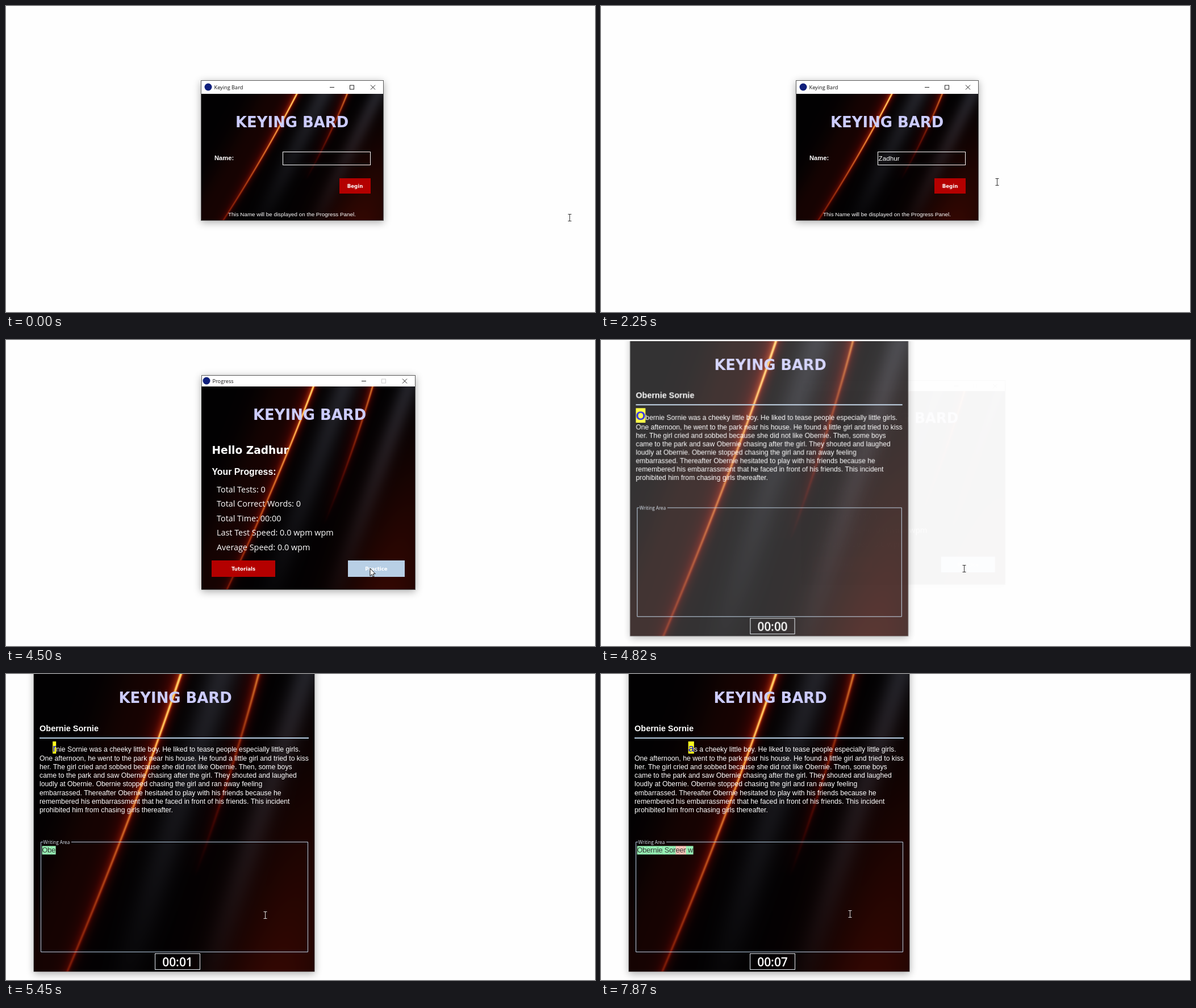
Animation of 1037x540 px, one loop 8 s. Source, as an HTML page with a canvas:

```html
<!DOCTYPE html>
<html lang="en">
<head>
<meta charset="utf-8">
<title>Keying Bard</title>
<style>
html, body { margin: 0; width: 100%; height: 100%; overflow: hidden; background: #fefefe; }
canvas { display: block; }
</style>
</head>
<body>
<canvas id="stage" width="1037" height="540"></canvas>
<script>
const W = 1037, H = 540, LOOP = 8000;
const KEY_GAP = 80, CLOCK_START = 5050, CLOCK_SECOND = 400;
const LOGIN_END = 3300, PROGRESS_END = 4690;

const stage = document.getElementById('stage').getContext('2d');
const layer = Object.assign(document.createElement('canvas'), { width: W, height: H });
const g = layer.getContext('2d');

const ARIAL = '"Liberation Sans", Arial, sans-serif';
const VERDANA = '"DejaVu Sans", Verdana, sans-serif';
const OPEN = '"Open Sans", "Noto Sans", sans-serif';
const RED = '#b40000', HOVER = '#cc0000', PALE = '#b8cfe5', LILAC = '#ccccff';

const USER = 'Zadhur';
const TITLE = 'Obernie Sornie';
const TYPED = 'Obernie Soreer w';
const STORY = [
  'Obernie Sornie was a cheeky little boy. He liked to tease people especially little girls.',
  'One afternoon, he went to the park near his house. He found a little girl and tried to kiss',
  'her. The girl cried and sobbed because she did not like Obernie. Then, some boys',
  'came to the park and saw Obernie chasing after the girl. They shouted and laughed',
  'loudly at Obernie. Obernie stopped chasing the girl and ran away feeling',
  'embarrassed. Thereafter Obernie hesitated to play with his friends because he',
  'remembered his embarrassment that he faced in front of his friends. This incident',
  'prohibited him from chasing girls thereafter.'
];

const clamp = (v, lo = 0, hi = 1) => Math.min(hi, Math.max(lo, v));
const progress = (t, start, span) => clamp((t - start) / span);
const easeOut = p => 1 - (1 - p) ** 2;

// Bursts of keystrokes: start time, number of keys, gap between keys
const NAME_BURSTS = [[380, 1], [930, 1], [1330, 1], [1480, 3]];
const STORY_BURSTS = [[5050, 1], [5280, 1], [5450, 5], [6320, 2, 0], [6390, 2, 0],
  [6620, 1], [7080, 1], [7390, 2, 0], [7870, 1]];

function keysTyped(bursts, t) {
  let total = 0;
  for (const [start, count, gap = KEY_GAP] of bursts) {
    for (let i = 0; i < count; i++) if (t >= start + i * gap) total++;
  }
  return total;
}

const MOVES = [
  { from: 1830, to: 2130, x: 697, y: 310 },
  { from: 2250, to: 2630, x: 617, y: 318 },
  { from: 3600, to: 3970, x: 641, y: 403 },
  { from: 4820, to: 5050, x: 456, y: 425 },
  { from: 6880, to: 7160, x: 438, y: 423 }
];
function pointerAt(t) {
  let x = 992, y = 373;
  for (const move of MOVES) {
    const p = easeOut(progress(t, move.from, move.to - move.from));
    x += (move.x - x) * p;
    y += (move.y - y) * p;
  }
  return [Math.round(x), Math.round(y)];
}

// Backdrop: two hot streaks, two slate beams and a dark red haze, in unit coordinates
const bell = (d, width) => Math.exp(-((d / width) ** 2));

function streakHeat(d) {
  const spread = d < 0 ? 1 : .5;
  return .62 * bell(d, .005) + .3 * bell(d, .02 * spread) + .22 * bell(d, .055 * spread);
}
function backdropColor(u, v) {
  const main = u - (.523 - .36 * v - .045 * v * v);
  const second = u - (.8 - .28 * v - .08 * v * v);
  const heat = clamp((1 - .62 * v) * streakHeat(main) + .72 * clamp(1 - v / .68) * streakHeat(second));
  const slate = clamp(1 - .85 * v) * (bell(u - .67 + .34 * v, .06) + bell(u - .97 + .34 * v, .05));
  const haze = .4 * bell(main + .12, .12) + v * bell(u - 1.12 + .25 * v, .22);
  return [
    2 + 255 * heat + 31 * slate + 48 * haze,
    1 + 200 * heat ** 2.5 + 32 * slate + 6 * haze,
    2 + 95 * heat ** 3.5 + 37 * slate
  ];
}
function makeBackdrop(w, h) {
  const c = Object.assign(document.createElement('canvas'), { width: w, height: h });
  const ctx = c.getContext('2d'), img = ctx.createImageData(w, h);
  for (let i = 0; i < w * h; i++) {
    img.data.set([...backdropColor(i % w / w, Math.floor(i / w) / h), 255], i * 4);
  }
  ctx.putImageData(img, 0, 0);
  return c;
}
const loginArt = makeBackdrop(320, 223);
const progressArt = makeBackdrop(376, 358);
const typingArt = makeBackdrop(494, 525);

function text(str, x, y, font, color = '#fff', align = 'left') {
  g.font = font;
  g.fillStyle = color;
  g.textAlign = align;
  g.fillText(str, x, y);
}
function width(str, font) {
  g.font = font;
  return g.measureText(str).width;
}
function box(x, y, w, h, color) {
  g.fillStyle = color;
  g.fillRect(x, y, w, h);
}
function outline(x, y, w, h, color) {
  g.strokeStyle = color;
  g.lineWidth = 1;
  g.strokeRect(x + .5, y + .5, w, h);
}
function line(color, points, ctx = g) {
  ctx.strokeStyle = color;
  ctx.lineWidth = 1;
  ctx.beginPath();
  points.forEach(([x, y]) => ctx.lineTo(x, y));
  ctx.stroke();
}
function button(label, x, y, w, h, color) {
  box(x, y, w, h, color);
  text(label, x + w / 2, y + h / 2 + 3.5, `bold 8.6px ${VERDANA}`, '#fff', 'center');
}
function appTitle(x, y) {
  text('KEYING BARD', x, y, `bold 25.9px ${VERDANA}`, LILAC);
}

function frame(x, y, w, h) {
  g.save();
  g.shadowColor = 'rgba(0,0,0,.33)';
  g.shadowBlur = 13;
  g.shadowOffsetY = 3;
  box(x, y, w, h, '#5a5a5a');
  g.restore();
}
function titleBar(x, y, w, h, label, iconX, maxColor) {
  const mid = y + h / 2 - .5, right = x + w, row = Math.round(mid) + .5;
  box(x, y, w, h, '#fff');
  g.fillStyle = '#10207c';
  g.beginPath();
  g.arc(iconX, mid, 6.5, 0, 2 * Math.PI);
  g.fill();
  text(label, iconX + 10.5, mid + 4, `9.2px ${OPEN}`, '#111');
  line('#222', [[right - 94, row], [right - 86, row]]);
  outline(right - 59, row - 4, 7, 7, maxColor);
  for (const side of [-4, 4]) {
    line('#222', [[right - 18 - side, row - 4], [right - 18 + side, row + 4]]);
  }
}

function drawLogin(t) {
  frame(343, 131, 322, 248);
  titleBar(344, 132, 320, 23, 'Keying Bard', 356, '#222');
  g.drawImage(loginArt, 344, 155);
  appTitle(404, 213.5);
  text('Name:', 367, 272, `bold 11.2px ${ARIAL}`);
  outline(487, 257, 154, 23, '#fff');
  text(USER.slice(0, keysTyped(NAME_BURSTS, t)), 488.5, 272.5, `11.7px ${ARIAL}`);
  button('Begin', 587, 304, 55, 27, t >= 3110 ? PALE : t >= 2480 ? HOVER : RED);
  text('This Name will be displayed on the Progress Panel.', 391, 371, `9.85px ${ARIAL}`);
}

function drawProgress(t) {
  frame(344, 62, 377, 379);
  titleBar(345, 63, 375, 19, 'Progress', 353, '#ccc');
  g.drawImage(progressArt, 344, 82);
  appTitle(435, 140.5);
  text('Hello ' + USER, 362.5, 201, `bold 18.6px ${VERDANA}`);
  text('Your Progress:', 362.5, 238, `bold 15.8px ${ARIAL}`);
  ['Total Tests: 0', 'Total Correct Words: 0', 'Total Time: 00:00',
    'Last Test Speed: 0.0 wpm wpm', 'Average Speed: 0.0 wpm'
  ].forEach((row, i) => text(row, 371, 268.5 + 25.5 * i, `14.4px ${OPEN}`));
  button('Tutorials', 362, 389, 112, 29, RED);
  button('Practice', 602, 389, 100, 29, t >= 4200 ? PALE : t >= 3890 ? HOVER : RED);
}

// The next key is enlarged, which pushes the lines below it down; a space collapses.
function drawStory(count) {
  const body = `12.25px ${ARIAL}`;
  const key = STORY[0][count], first = count === 0;
  const size = first ? 22 : key === ' ' ? 12.25 : 18.2;
  const big = `${first ? 'bold ' : ''}${size}px ${ARIAL}`;
  const base = 120 + .92 * size;
  const x = 59 + width(STORY[0].slice(0, count), body);
  const keyWidth = width(key, big);
  if (key !== ' ') {
    box(x, 119, keyWidth, 1.18 * size, '#ffff1e');
    text(key, x, base, big, '#0000e6');
  }
  text(STORY[0].slice(count + 1), x + keyWidth, base, body);
  STORY.slice(1).forEach((row, i) => text(row, 59, base + 16.3 + 15.15 * i, body));
}

function drawTyped(count) {
  const font = `12.6px ${ARIAL}`;
  const edge = n => 63.5 + width(TYPED.slice(0, n), font);
  for (let i = 0; i < count; i++) {
    const right = TYPED[i] === STORY[0][i];
    box(edge(i), 303.5, edge(i + 1) - edge(i) + .3, 15, right ? '#98f2b6' : '#ffc8bc');
  }
  text(TYPED.slice(0, count), 63.5, 315, font, '#333');
}

function drawTyping(t) {
  const seconds = Math.max(0, Math.floor((t - CLOCK_START) / CLOCK_SECOND));
  frame(48.5, -30, 495, 555.5);
  g.drawImage(typingArt, 49, 0);
  appTitle(198.5, 50.5);
  text(TITLE, 59, 101, `bold 14.5px ${ARIAL}`);
  box(59, 112, 474, 2, PALE);
  drawStory(keysTyped(STORY_BURSTS, t));
  line(PALE, [[65, 296.5], [61.5, 296.5], [61.5, 490.5], [531.5, 490.5], [531.5, 296.5], [115, 296.5]]);
  text('Writing Area', 65.5, 299.5, `8.15px ${OPEN}`, '#dce8f5');
  drawTyped(keysTyped(STORY_BURSTS, t));
  outline(262, 493, 79, 28, '#e8eef5');
  text('00:0' + seconds, 302, 515.8, `600 21px ${OPEN}`, '#fff', 'center');
}

// Windows open slowly and close fast, growing or shrinking by a twentieth.
function show(draw, cx, cy, t, opens, closes) {
  const shown = easeOut(progress(t, opens, 235)), gone = progress(t, closes, 135);
  const alpha = shown * (1 - gone), scale = 1 - .05 * (1 - shown + gone);
  if (alpha <= 0) return;
  g.clearRect(0, 0, W, H);
  draw(t);
  stage.save();
  stage.globalAlpha = alpha;
  stage.translate(cx, cy);
  stage.scale(scale, scale);
  stage.drawImage(layer, -cx, -cy);
  stage.restore();
}

function drawArrow(x, y) {
  const shape = new Path2D('M0 0V13.5L3 10.6L5 15.2L7 14.3L5 9.9L9.2 9.6Z');
  stage.save();
  stage.translate(x, y);
  stage.fillStyle = '#fff';
  stage.fill(shape);
  stage.strokeStyle = '#111';
  stage.lineWidth = 1;
  stage.stroke(shape);
  stage.restore();
}
function drawBeam(x, y, color) {
  const cx = x + .5, top = y - 5.5, bottom = y + 6.5;
  line(color, [[cx, top], [cx, bottom]], stage);
  for (const end of [top, bottom]) line(color, [[cx - 3, end], [cx + 3, end]], stage);
}
function drawPointer(t) {
  const [x, y] = pointerAt(t);
  const overWindow = t >= LOGIN_END ? t < 4820 : x < 664;
  if (overWindow) drawArrow(x, y);
  else drawBeam(x, y, x < 543 ? '#ddd' : '#333');
}

function render(t) {
  stage.fillStyle = '#fefefe';
  stage.fillRect(0, 0, W, H);
  show(drawLogin, 504, 255, t, -LOOP, LOGIN_END);
  show(drawProgress, 532.5, 251.5, t, LOGIN_END, PROGRESS_END);
  show(drawTyping, 296, 245, t, PROGRESS_END, LOOP);
  drawPointer(t);
}

function tick() {
  render(performance.now() % LOOP);
  requestAnimationFrame(tick);
}
tick();
</script>
</body>
</html>
```
